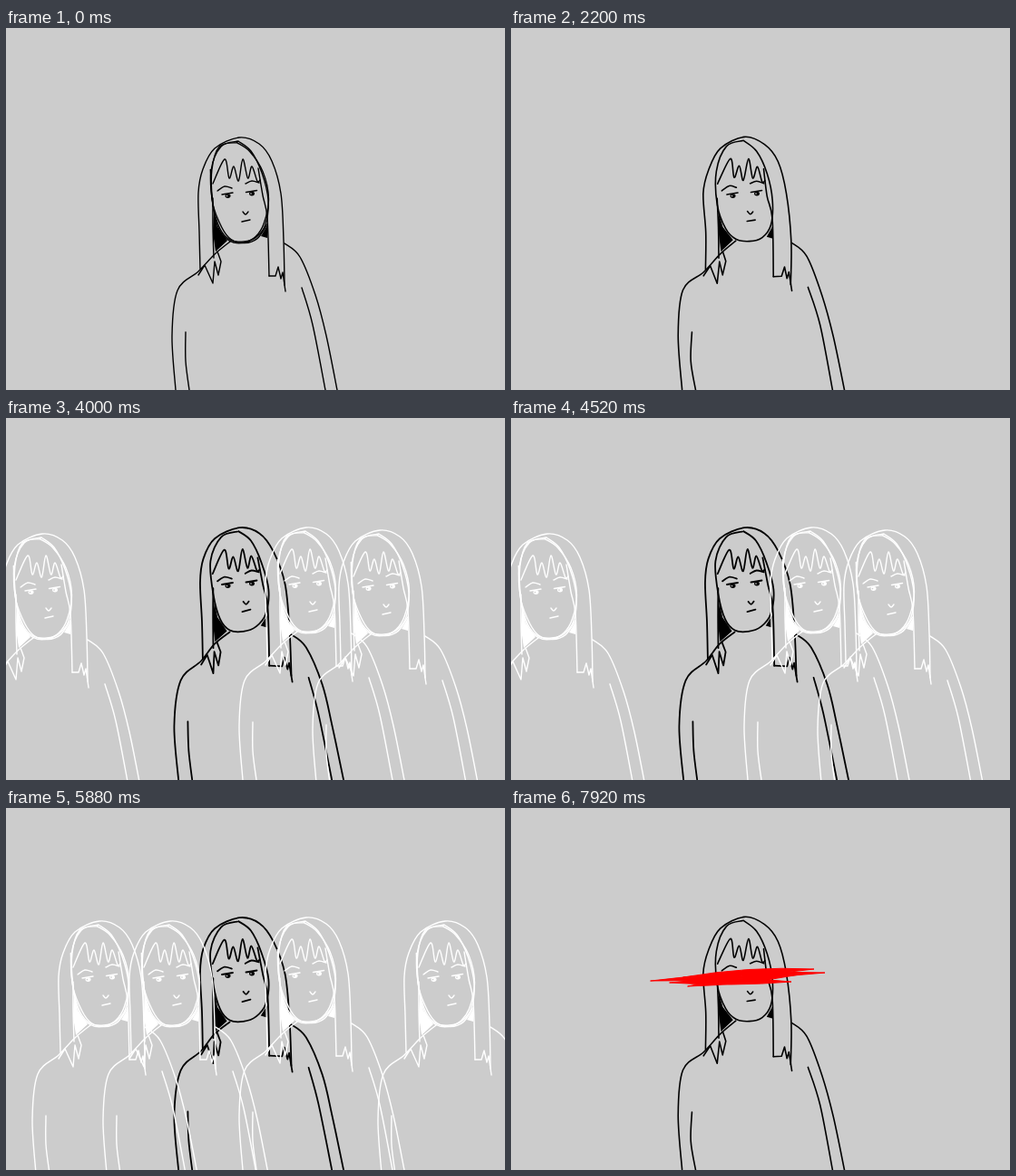
Recreate the animation shown at these times as an HTML page. Size 550 by 400 pixels, loop 8 s.

```html
<!DOCTYPE html>
<html lang="en">
<head>
<meta charset="utf-8">
<title>Figure</title>
<style>
  html, body { margin: 0; width: 100%; height: 100%; overflow: hidden; background: #ccc; }
  svg { display: block; width: 550px; height: 400px; }
</style>
</head>
<body>
<svg viewBox="0 0 550 400">
  <defs id="parts"></defs>
  <rect id="back" width="550" height="400"/>
  <g id="stage" fill="none" stroke-linecap="round" stroke-linejoin="round"></g>
</svg>
<script>
const LOOP = 8000, TICK = 40, BOIL = 1000 / 15;
const WHITES = 2680, BLACK = 6440, RED = 7520;
const GRAY = '#ccc';

// One drawing, redrawn four times by hand: flare widens the right hair, tuck pulls in the left
const poses = {
  A: { seed: 0, wobble: 0, flare: 0, tuck: 0, weight: 1.4, sketchy: true },
  B: { seed: 1, wobble: 0.8, flare: 4, tuck: 0, weight: 1.6 },
  C: { seed: 2, wobble: 0.8, flare: 2, tuck: 1, weight: 1.6 },
  D: { seed: 3, wobble: 0.6, flare: 7, tuck: 3, weight: 1.8 }
};
const ORDER = 'ABDADCBCDACBDB';

const parse = text => text.split(' ').map(p => p.split(',').map(Number));
const polyline = points => 'M' + points.join('L');

function smooth(points) {
  let d = 'M' + points[0];
  for (let i = 0; i < points.length - 1; i++) {
    const p = points[i], q = points[i + 1];
    const before = points[i - 1] || p, after = points[i + 2] || q;
    const c1 = p.map((v, j) => v + (q[j] - before[j]) / 6);
    const c2 = q.map((v, j) => v - (after[j] - p[j]) / 6);
    d += `C${c1} ${c2} ${q}`;
  }
  return d;
}

function fringe() {
  const points = [[228, 172]];
  for (let i = 0; i < 4; i++) {
    points.push([241 + 10 * i, 145 + (i % 2) * 8], [246 + 10.3 * i, 166 + (i % 2) * 3]);
  }
  return [...points, [280, 168]];
}

function figure(id) {
  const { seed, wobble, flare, tuck, weight, sketchy } = poses[id];

  const bend = (points, amount = wobble, phase = seed) => points.map(([x, y]) => [
    x + amount * Math.sin(y * 0.07 + phase * 2.1),
    y + amount * Math.sin(x * 0.09 + phase * 3.7)
  ]);
  // Hair sides move more the further down they hang
  const hang = points => points.map(([x, y]) => {
    const drop = Math.min(1, Math.max(0, (y - 120) / 100));
    return [x + drop * (x > 291 ? flare : x < 222 ? tuck : 0), y];
  });
  const stroke = d => `<path d="${d}"/>`;
  const curve = text => stroke(smooth(bend(hang(parse(text)))));
  const lines = text => stroke(polyline(bend(hang(parse(text)))));
  const shade = text => `<path d="${polyline(bend(parse(text)))}Z" fill="currentColor" stroke="none"/>`;
  const eye = (x, y) => stroke(`M${x - 6},${y}L${x + 6},${y - 2}`) +
    `<ellipse cx="${x + 0.5}" cy="${y + 1.6}" rx="3" ry="2.4" fill="currentColor" stroke="none"/>` +
    `<circle cx="${x - 0.5}" cy="${y + 1.6}" r="0.8" fill="${GRAY}" stroke="none"/>`;

  const head = parse('256,125 237,131 226,158 228,195 236,222 247,234 262,236 276,231 286,217 289,190 282,160 270,136 256,125');
  const outlines = [bend(head)];
  if (sketchy) outlines.push(bend(head, 1.6, 1), bend(head.slice(2, 9), 1.8, 2.4));

  return `<g id="${id}" stroke="currentColor" stroke-width="${weight}">` +
    curve('214,266 213,225 212,182 217,156 230,133 257,121 279,128 293,147 303,183 306,235 307,284') +
    lines('212,273 219,262 228,282 230,258 234,273 237,258 233,247') +
    lines('290,274 297,274 300,264 303,277 305,270 308,291') +
    curve('228,188 228,220 229,254') +
    curve('278,155 283,185 288,210 290,274') +
    outlines.map(points => stroke(smooth(points))).join('') +
    stroke(smooth(bend(fringe()))) +
    curve('233,180 241,175 249,177') + curve('264,172 271,169 279,171') +
    eye(244, 184) + eye(270.5, 181.5) +
    curve('261,203 264,206 267,203') + lines('260,214 269,212') +
    shade('229,203 233,220 244,235 231,247 228,226') +
    shade('288,218 281,230 288,232') +
    curve('247,236 230,250 212,269 189,290 183,340 187,400') +
    curve('198,336 198,368 202,400') +
    curve('307,238 324,253 341,295 353,340 365,400') +
    curve('326,287 338,328 352,400') +
    '</g>';
}

function scribble() {
  const lens = ([x1, y1, x2, y2]) => {
    const x = (x1 + x2) / 2, y = (y1 + y2) / 2;
    return `M${x1},${y1}Q${x},${y - 8} ${x2},${y2}Q${x},${y + 5} ${x1},${y1}`;
  };
  const swipes = [[154, 191, 346, 182], [190, 187, 334, 178], [175, 193, 309, 192], [195, 197, 318, 184]];
  return `<path id="scribble" d="${swipes.map(lens).join('')}" fill="currentColor" stroke="currentColor"/>`;
}

// Offsets of the white copies, and when each arrangement begins
const beside = [74, 0];
const row = [beside, [-76, 4], [-154, 4], [227, 4]];
const wide = [[-217, 7], beside, [155, 3]];
const crowds = [
  [0, []], [WHITES, row.slice(0, 1)], [2960, row.slice(0, 2)],
  [3240, row], [3640, wide], [4800, row], [BLACK, []]
];

const copy = (id, color, [x, y] = [0, 0]) => `<use href="#${id}" x="${x}" y="${y}" color="${color}"/>`;
const back = document.getElementById('back');
const stage = document.getElementById('stage');
document.getElementById('parts').innerHTML = Object.keys(poses).map(figure).join('') + scribble();

function scene(t) {
  if (t >= BLACK && t < RED) return '';
  const step = Math.floor((t + 14) / BOIL);
  const crowd = crowds.filter(([start]) => t >= start).pop()[1];
  return copy(ORDER[step % ORDER.length], '#000') +
    crowd.map(at => copy('A', '#fff', at)).join('') +
    (t >= RED ? copy('scribble', '#f00') : '');
}

let shown = null;
function draw(now) {
  const t = Math.floor((now % LOOP) / TICK) * TICK;
  const markup = scene(t);
  if (markup === shown) return;
  shown = markup;
  back.setAttribute('fill', markup ? GRAY : '#000');
  stage.innerHTML = markup;
}

const begin = performance.now();
function loop() {
  draw(performance.now() - begin);
  requestAnimationFrame(loop);
}
loop();
</script>
</body>
</html>
```
